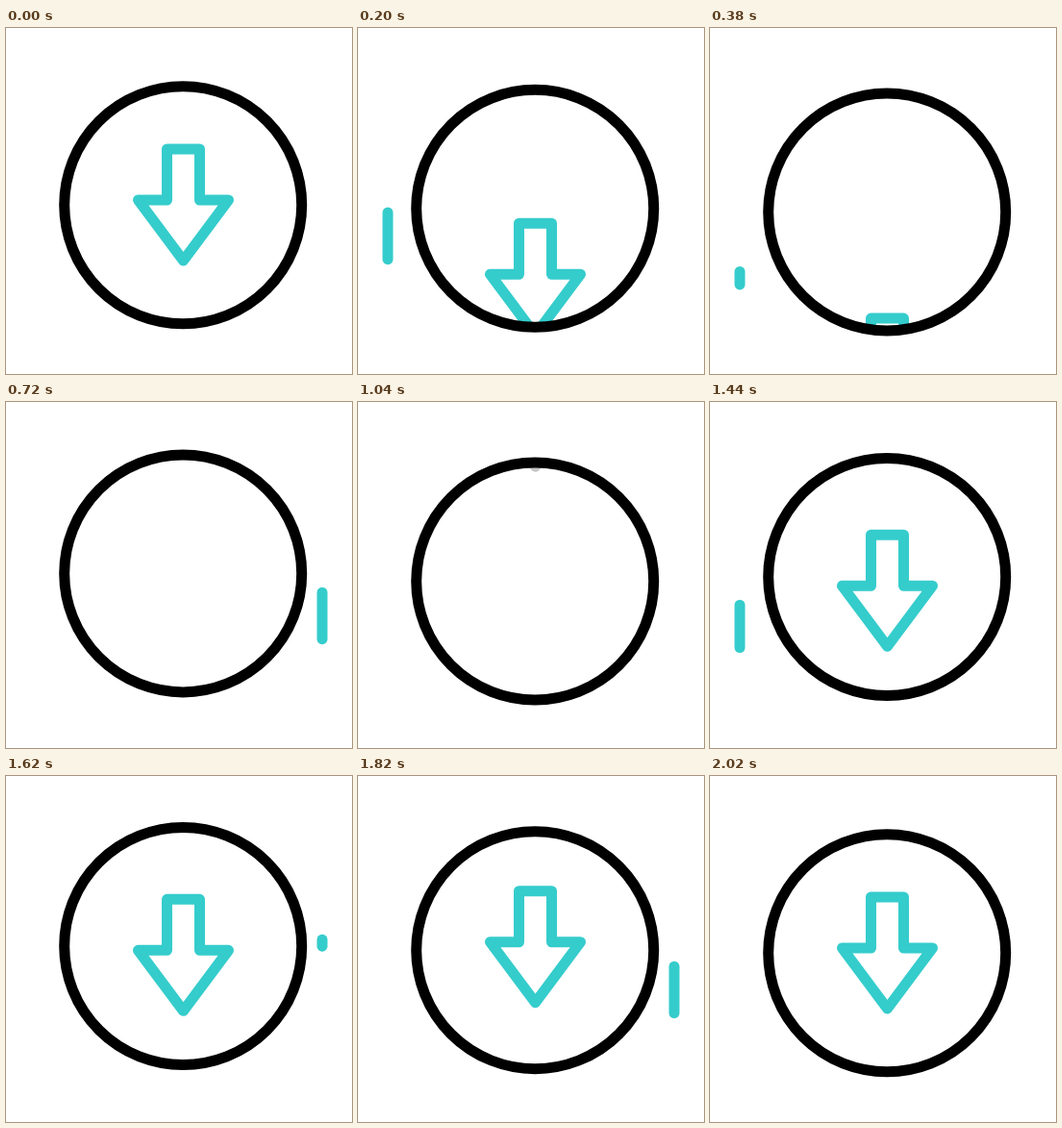
An HTML page with a canvas for the animation above (2120 ms loop, 360x360 px).

```html
<!DOCTYPE html>
<html lang="en">
<head>
<meta charset="utf-8">
<title>Download</title>
<style>
  html, body { margin: 0; width: 100%; height: 100%; overflow: hidden; background: #fff; }
  canvas { display: block; width: 360px; height: 360px; }
</style>
</head>
<body>
<canvas id="stage" width="360" height="360"></canvas>
<script>
const ctx = document.getElementById('stage').getContext('2d');
const LOOP = 2120, END = 2020, STEP = 20;
const TEAL = '#35cccc', CX = 184.2, R = 123.5, LINE = 11;

// Keyframes are [time, value] pairs, joined with sine easing.
const ringKeys = [[0, 184.2], [400, 191.5], [800, 177], [1200, 191.5], [1600, 177], [2000, 184.2]];
const exitKeys = [[0, 0], [450, 187]];
const enterKeys = [[970, -187], [1410, 12.5], [1810, -6.3], [2000, 0]];
const arrow = [[167.5, 126], [201.5, 126], [201.5, 179], [231.5, 179], [184.5, 242], [137.5, 179], [167.5, 179]];

const streaks = [
  { x: 31, start: 10 }, { x: 329, start: 505 },
  { x: 31, start: 1180 }, { x: 329, start: 1605 }
];
const STREAK_TIME = 400, STREAK_TOP = 170, STREAK_LEN = 97.5;

function valueAt(keys, t) {
  if (t <= keys[0][0]) return keys[0][1];
  for (let i = 1; i < keys.length; i++) {
    const [t0, a] = keys[i - 1], [t1, b] = keys[i];
    if (t < t1) return a + (b - a) * (1 - Math.cos(Math.PI * (t - t0) / (t1 - t0))) / 2;
  }
  return keys[keys.length - 1][1];
}

function drawArrow(t, ringY) {
  const dy = valueAt(t < 700 ? exitKeys : enterKeys, t);
  ctx.save();
  ctx.beginPath();
  ctx.arc(CX, ringY, R, 0, Math.PI * 2);
  ctx.clip();
  ctx.translate(0, dy);
  ctx.beginPath();
  arrow.forEach(([x, y]) => ctx.lineTo(x, y));
  ctx.closePath();
  // The tip enters as pale grey before it takes its colour.
  ctx.strokeStyle = t > 700 && t < 1060 ? '#c6c6c6' : TEAL;
  ctx.stroke();
  ctx.restore();
}

function drawStreak({ x, start }, t) {
  const u = (t - start) / STREAK_TIME;
  if (u <= 0 || u >= 1) return;
  const head = 1 - (1 - u) ** 2, tail = u * u;
  ctx.beginPath();
  ctx.moveTo(x, STREAK_TOP + STREAK_LEN * tail);
  ctx.lineTo(x, STREAK_TOP + STREAK_LEN * head);
  ctx.strokeStyle = TEAL;
  ctx.stroke();
}

function draw(t) {
  const ringY = valueAt(ringKeys, t);
  ctx.fillStyle = '#fff';
  ctx.fillRect(0, 0, 360, 360);
  ctx.lineWidth = LINE;
  ctx.lineCap = ctx.lineJoin = 'round';
  drawArrow(t, ringY);
  ctx.beginPath();
  ctx.arc(CX, ringY, R, 0, Math.PI * 2);
  ctx.strokeStyle = '#000';
  ctx.stroke();
  streaks.forEach(s => drawStreak(s, t));
}

const begin = performance.now();
function tick() {
  const t = (performance.now() - begin) % LOOP;
  draw(Math.min(END, Math.floor(t / STEP) * STEP));
  requestAnimationFrame(tick);
}
tick();
</script>
</body>
</html>
```
